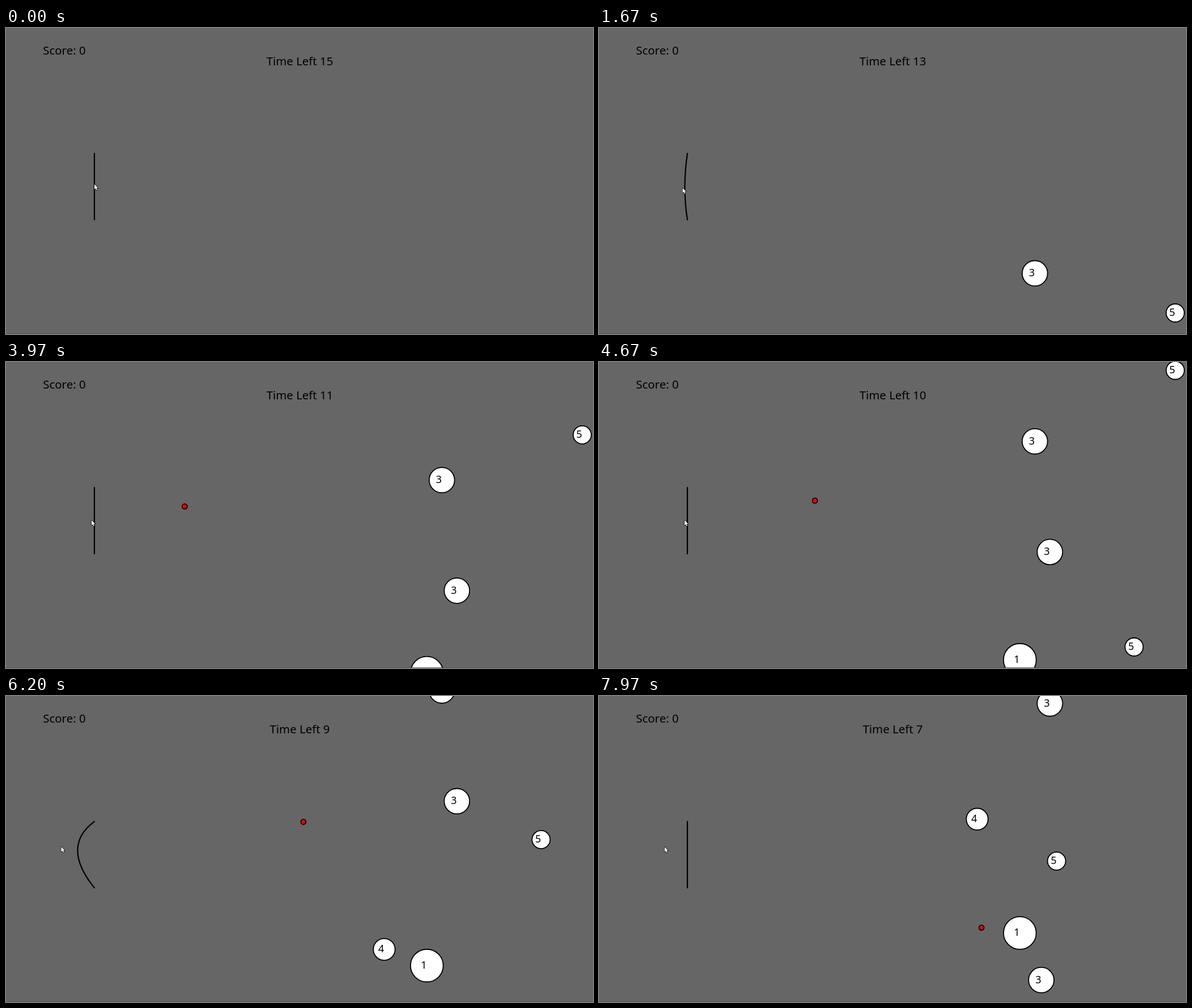
An HTML page with a canvas for the animation above (8 s loop, 1036 px wide and 541 px high).

```html
<!DOCTYPE html>
<html lang="en">
<head>
<meta charset="utf-8">
<title>Slingshot game</title>
<style>
html, body { margin: 0; width: 100%; height: 100%; overflow: hidden; background: #666; }
canvas { display: block; }
</style>
</head>
<body>
<canvas id="stage" width="1036" height="541"></canvas>
<script>
const WIDTH = 1036, HEIGHT = 541;
const LOOP = 8000, FRAME = 100 / 3;
const FIRST_SECOND = 340;   // when the game clock first ticks
const RISE = 0.0326;        // px per ms for each point of a ball's value
const POWER = 0.0067;       // shot speed in px per ms for each px of pull
const RECOIL = 80;          // ms for the string to spring back to 1/e
const REST = { x: 156, y: 280.5, half: 58.6 };
const FONT = '"Noto Sans", "Open Sans", sans-serif';

const ctx = document.getElementById('stage').getContext('2d');

// One ball enters below the stage with every tick of the game clock
const BALLS = [
  { value: 3, x: 769.3 }, { value: 5, x: 1017 }, { value: 3, x: 795.8 }, { value: 1, x: 742.8 },
  { value: 5, x: 944.4 }, { value: 4, x: 667.5 }, { value: 5, x: 807.6 }, { value: 3, x: 780.6 }
];

const POINTER_START = { x: 155.5, y: 275.5 };
const MOVES = [
  { from: 0, to: 130, x: 151.5, y: 276.5 },
  { from: 1100, to: 1670, x: 147, y: 282 },
  { from: 1700, to: 2100, x: 142, y: 282.7 },
  { from: 2300, to: 2800, x: 150.5, y: 279 },
  { from: 5430, to: 6500, x: 76, y: 260.6 },
  { from: 7560, to: 7970, x: 115.5, y: 266 }
];

const SHOTS = [{ press: 1200, release: 2118 }, { press: 5380, release: 6849 }];

const mix = (a, b, k) => ({ x: a.x + (b.x - a.x) * k, y: a.y + (b.y - a.y) * k });

function pointerAt(t) {
  return MOVES.reduce((pos, move) => {
    const k = (t - move.from) / (move.to - move.from);
    return mix(pos, move, Math.min(1, Math.max(0, k)));
  }, POINTER_START);
}

function disc(x, y, r, fill) {
  ctx.beginPath();
  ctx.arc(x, y, r, 0, Math.PI * 2);
  ctx.fillStyle = fill;
  ctx.fill();
  ctx.lineWidth = 1.8;
  ctx.stroke();
}

function label(text, x, y, size, align) {
  ctx.font = `${size}px ${FONT}`;
  ctx.textAlign = align;
  ctx.fillStyle = '#000';
  ctx.fillText(text, x, y);
}

function drawBall({ value, x }, index, t) {
  const age = t - FIRST_SECOND - index * 1000;
  if (age < 0) return;
  const r = 32.1 - 3.22 * value;
  const y = HEIGHT + r - RISE * value * age;
  disc(x, y, r, '#fff');
  label(value, x - 5.3, y + 5.4, 18, 'center');
}

function drawString(t, shot) {
  let pull = REST;
  if (shot) {
    pull = t < shot.release
      ? pointerAt(t)
      : mix(REST, pointerAt(shot.release), Math.exp((shot.release - t) / RECOIL));
  }
  ctx.beginPath();
  ctx.moveTo(REST.x, REST.y - REST.half);
  ctx.quadraticCurveTo(pull.x, pull.y, REST.x, REST.y + REST.half);
  ctx.lineWidth = 2.2;
  ctx.stroke();
}

function drawShot(t, shot) {
  const origin = pointerAt(shot.release);
  const { x, y } = mix(origin, REST, POWER * (t - shot.release));
  disc(x, y, 4.5, '#f00');
}

const arrow = new Path2D('M0 0V9L2 7.2L3.5 10.4L5 9.7L3.6 6.6H6.2Z');
function drawPointer({ x, y }) {
  ctx.save();
  ctx.translate(x + 0.6, y + 0.7);
  ctx.lineWidth = 1.3;
  ctx.stroke(arrow);
  ctx.fillStyle = '#fff';
  ctx.fill(arrow);
  ctx.restore();
}

function draw(time) {
  const t = Math.floor((time % LOOP + 3.4) / FRAME) * FRAME;
  const secondsGone = Math.max(0, Math.floor((t - FIRST_SECOND) / 1000) + 1);

  ctx.fillStyle = '#666';
  ctx.fillRect(0, 0, WIDTH, HEIGHT);
  ctx.strokeStyle = '#000';
  ctx.lineCap = ctx.lineJoin = 'round';

  drawString(t, SHOTS.findLast(s => t >= s.press));
  BALLS.forEach((ball, i) => drawBall(ball, i, t));
  const flying = SHOTS.findLast(s => t >= s.release);
  if (flying) drawShot(t, flying);

  label('Score: 0', 65.3, 47, 20.4, 'left');
  label(`Time Left ${15 - secondsGone}`, 518.5, 66, 20.4, 'center');
  ctx.fillStyle = '#505050';
  ctx.fillRect(0, HEIGHT - 1, WIDTH, 1);
  drawPointer(pointerAt(t));
}

const start = performance.now();
function loop() {
  draw(performance.now() - start);
  requestAnimationFrame(loop);
}
loop();
</script>
</body>
</html>
```
